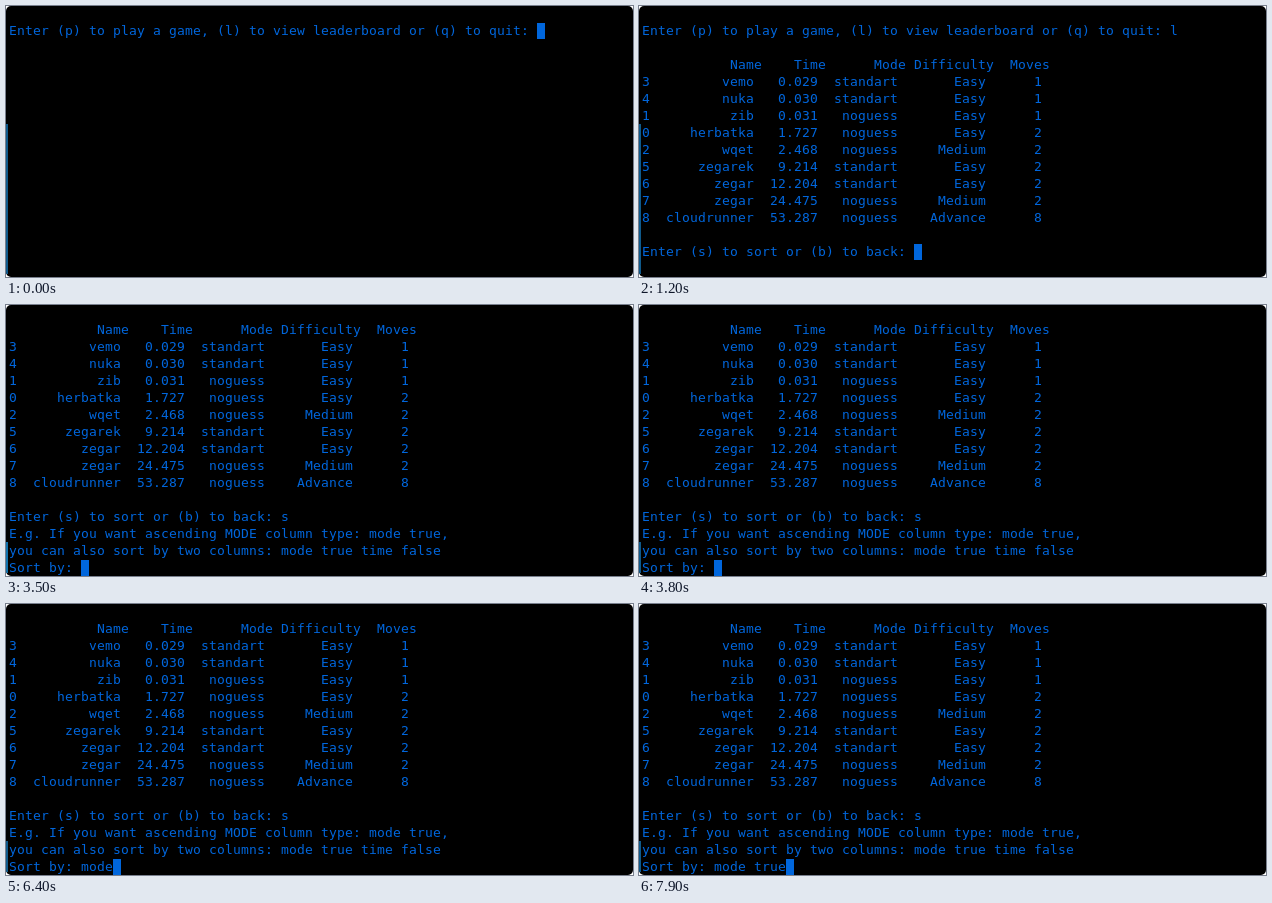
An HTML page for the animation above (8000 ms loop, 627 by 271 pixels).

```html
<!DOCTYPE html>
<html lang="en">
<head>
<meta charset="utf-8">
<title>Leaderboard in a terminal</title>
<style>
html, body { margin: 0; width: 100%; height: 100%; overflow: hidden; background: #fff; }
#term { position: relative; width: 627px; height: 271px; overflow: hidden; border-radius: 5px; background: #000; }
#screen {
  position: absolute; left: 3px; top: -1px; margin: 0; color: #0066dc;
  font: 13px/17px "DejaVu Sans Mono", monospace; letter-spacing: calc(8px - 1ch);
}
#cursor { position: absolute; width: 8px; height: 16px; background: #0066dc; }
#bar { position: absolute; left: 0; width: 2px; bottom: 3px; }
</style>
</head>
<body>
<div id="term">
  <pre id="screen"></pre>
  <div id="cursor"></div>
  <div id="bar"></div>
</div>
<script>
const LOOP = 8000, ROWS = 16, CELL_W = 8, CELL_H = 17;
const [screenEl, cursor, bar] = ['screen', 'cursor', 'bar'].map(id => document.getElementById(id));

const widths = [13, 8, 10, 11, 7];
const row = (index, ...cells) => index + cells.map((c, i) => c.padStart(widths[i])).join('');

const table = [
  row('  ', 'Name', 'Time', 'Mode', 'Difficulty', 'Moves'),
  row('3', 'vemo', '0.029', 'standart', 'Easy', '1'),
  row('4', 'nuka', '0.030', 'standart', 'Easy', '1'),
  row('1', 'zib', '0.031', 'noguess', 'Easy', '1'),
  row('0', 'herbatka', '1.727', 'noguess', 'Easy', '2'),
  row('2', 'wqet', '2.468', 'noguess', 'Medium', '2'),
  row('5', 'zegarek', '9.214', 'standart', 'Easy', '2'),
  row('6', 'zegar', '12.204', 'standart', 'Easy', '2'),
  row('7', 'zegar', '24.475', 'noguess', 'Medium', '2'),
  row('8', 'cloudrunner', '53.287', 'noguess', 'Advance', '8')
].join('\n');

// Terminal output: [time in ms, appended text]
const log = [
  [0, '\nEnter (p) to play a game, (l) to view leaderboard or (q) to quit: '],
  [500, 'l'],
  [1200, '\n\n' + table + '\n\nEnter (s) to sort or (b) to back: '],
  [2800, 's'],
  [3500, '\nE.g. If you want ascending MODE column type: mode true,\n' +
         'you can also sort by two columns: mode true time false\nSort by: '],
  [5900, 'm'], [6000, 'o'], [6400, 'de'], [6800, ' '],
  [7500, 't'], [7600, 'r'], [7800, 'u'], [7900, 'e']
];

function draw(t) {
  const text = log.filter(([at]) => at <= t).map(([, s]) => s).join('');
  const lines = text.split('\n').slice(-ROWS);
  const last = lines.length - 1;
  screenEl.textContent = lines.join('\n');
  cursor.style.left = 3 + lines[last].length * CELL_W + 'px';
  cursor.style.top = last * CELL_H + 'px';
  bar.style.top = (t < 3500 ? 118 : 237) + 'px';
  bar.style.background = t >= 3500 && t < 3800 ? '#1172ad' : '#0f5a8c';
}

function tick() {
  draw(performance.now() % LOOP);
  requestAnimationFrame(tick);
}
tick();
</script>
</body>
</html>
```
